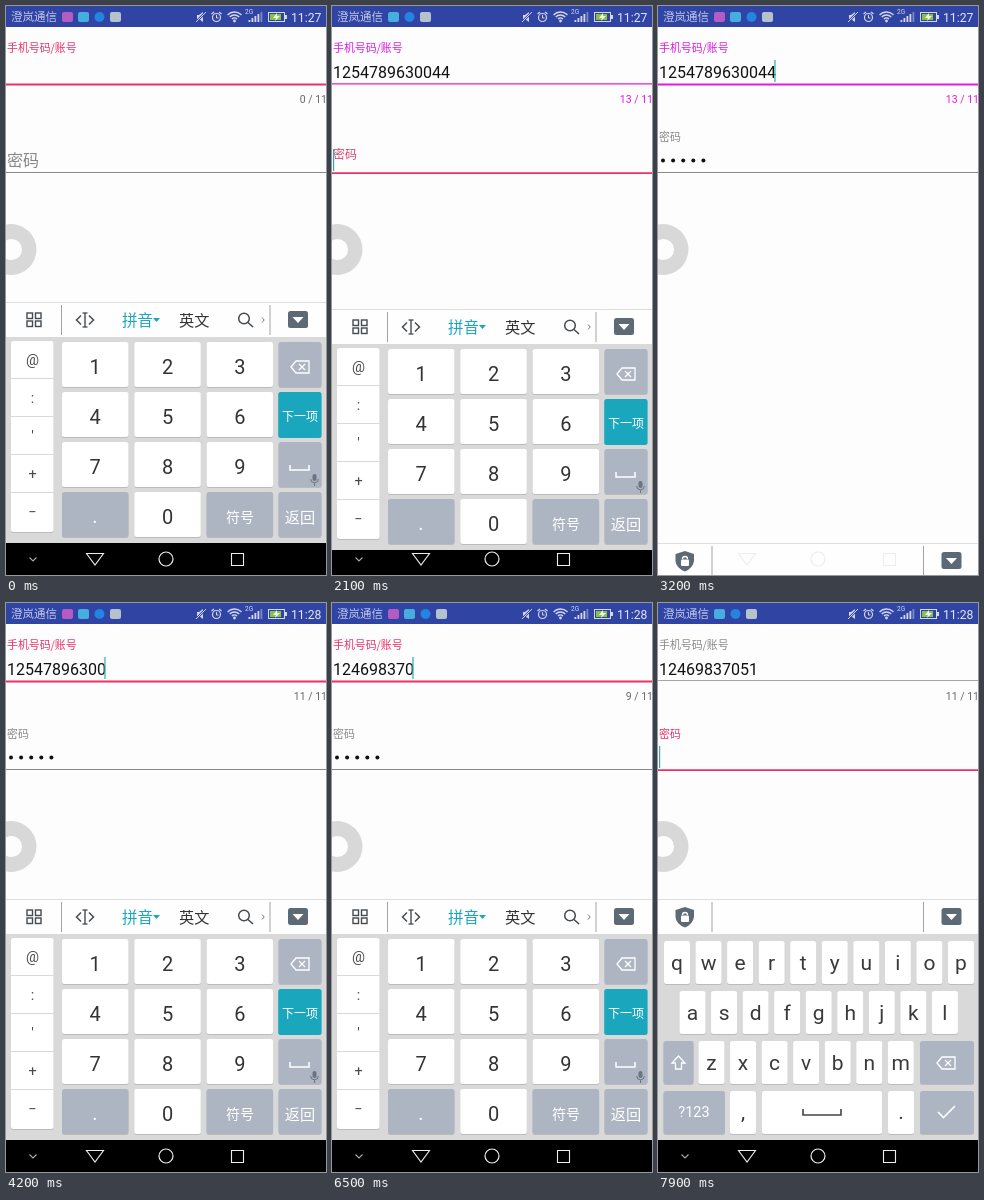
Recreate the animation shown at these times as an HTML page with a canvas. Size 320 by 569 pixels, loop 8 s.

```html
<!DOCTYPE html>
<html lang="zh-CN">
<head>
<meta charset="utf-8">
<title>Login form</title>
<style>
html, body { margin: 0; width: 100%; height: 100%; overflow: hidden; background: #fdfdfd; }
canvas { display: block; width: 320px; height: 569px; }
</style>
</head>
<body>
<canvas id="stage"></canvas>
<script>
const W = 320, H = 569, LOOP = 8000, STEP = 100;
const canvas = document.getElementById('stage');
const dpr = window.devicePixelRatio || 1;
canvas.width = W * dpr;
canvas.height = H * dpr;
const c = canvas.getContext('2d');
const CJK = '"Noto Sans CJK SC", "Noto Sans CJK", sans-serif';
const ROBOTO = 'Roboto, sans-serif';

const PINK = [238, 48, 102], GREY = [136, 136, 136], MAGENTA = [228, 24, 226];
const TEAL = '#1aa7be', KEY_GREY = '#adb5c3', SLATE = '#5d6a76';
const FIRST = '1254789630044', SECOND = '12469837051';

// Touch times
const firstAt = i => 220 + i * 130;
const secondAt = i => 5060 + i * 170;
const eraseAt = i => i < 2 ? 3900 + i * 200 : 4260 + (i - 2) * 55;
const dotAt = i => 2560 + i * 90;
const undotAt = i => 7380 + i * 85;
const TO_PASS = 1960, TO_PHONE = 2960, TO_PASS_2 = 6830;

const clamp = x => Math.max(0, Math.min(1, x));
const ramp = (t, start, len) => clamp((t - start) / len);
const lerp = (a, b, u) => a + (b - a) * u;
const rgb = a => `rgb(${a.map(Math.round)})`;
const mix = (a, b, u) => rgb(a.map((v, i) => lerp(v, b[i], u)));

function done(t, at, n) {
  let k = 0;
  while (k < n && t >= at(k)) k++;
  return k;
}

function pressed(t, at, n) {
  for (let i = 0; i < n; i++) if (t >= at(i) - 80 && t < at(i) - 15) return i;
  return -1;
}

function text(s, x, y, size, color, align = 'left', family = ROBOTO, weight = 400) {
  c.font = `${weight} ${size}px ${family}`;
  c.textAlign = align;
  c.fillStyle = color;
  c.fillText(s, x, y);
}

function box(x, y, w, h, color, r = 0) {
  c.fillStyle = color;
  c.beginPath();
  c.roundRect(x, y, w, h, r);
  c.fill();
}

function disc(x, y, r, color) {
  c.fillStyle = color;
  c.beginPath();
  c.arc(x, y, r, 0, Math.PI * 2);
  c.fill();
}

function ring(x, y, r, color, w = 1, a = 0, b = Math.PI * 2) {
  c.strokeStyle = color;
  c.lineWidth = w;
  c.beginPath();
  c.arc(x, y, r, a, b);
  c.stroke();
}

function trace(pts, close) {
  c.beginPath();
  for (let i = 0; i < pts.length; i += 2) c.lineTo(pts[i], pts[i + 1]);
  if (close) c.closePath();
}

function line(pts, color, w = 1, close = false) {
  trace(pts, close);
  c.strokeStyle = color;
  c.lineWidth = w;
  c.stroke();
}

function poly(pts, color) {
  trace(pts, true);
  c.fillStyle = color;
  c.fill();
}

function state(t) {
  let phone;
  if (t < 3800) phone = FIRST.slice(0, done(t, firstAt, 13));
  else if (t < 4900) phone = FIRST.slice(0, 13 - done(t, eraseAt, 13));
  else phone = SECOND.slice(0, done(t, secondAt, 11));
  const dots = done(t, dotAt, 5) - done(t, undotAt, 5);
  const onPhone = t < TO_PASS || (t >= TO_PHONE && t < TO_PASS_2);
  const focus = 1 - ramp(t, TO_PASS, 200) + ramp(t, TO_PHONE, 200) - ramp(t, TO_PASS_2, 200);

  let key = '';
  const a = pressed(t, firstAt, 13), b = pressed(t, secondAt, 11), d = pressed(t, dotAt, 5);
  if (a >= 0) key = FIRST[a];
  if (b >= 0) key = SECOND[b];
  if (d >= 0) key = 'asdfg'[d];
  if (pressed(t, eraseAt, 2) >= 0 || (t > 4220 && t < 4800) || pressed(t, undotAt, 5) >= 0) key = 'del';
  return { t, phone, dots, onPhone, focus, key };
}

function statusBar(s) {
  const ink = '#d3d8f0';
  box(0, 0, W, 21, '#3044a4');
  text('澄岚通信', 5, 15, 11.5, '#c3c9ea', 'left', CJK);
  let x = 56;
  const imeIcon = s.t < 2080 || (s.t >= 3000 && s.t < 6870);
  if (imeIcon) { box(x, 6, 11, 10, '#b45cc4', 2); x += 16; }
  box(x, 6, 11, 10, '#45aede', 2);
  disc(x + 21.5, 11, 5, '#2583e2');
  box(x + 32, 6, 11, 10, '#b5c2cc', 2);

  poly([191, 9, 193, 9, 197, 6, 197, 16, 193, 13, 191, 13], ink);
  line([190, 16, 200, 6], '#3044a4', 2.4);
  line([190, 16, 200, 6], ink, 1);
  ring(210.5, 11.5, 4, ink, 1.2);
  line([210.5, 9, 210.5, 12, 212.5, 12], ink);
  line([205.5, 8, 208, 6], ink, 1.2);
  line([213, 6, 215.5, 8], ink, 1.2);
  for (const r of [3.5, 6.5, 9.5]) ring(228.5, 15.5, r, ink, 1.4, -Math.PI * 0.76, -Math.PI * 0.24);
  disc(228.5, 15, 1.4, ink);
  text('2G', 239, 8, 6.5, ink);
  for (let i = 0; i < 5; i++) box(242.5 + i * 3, 14 - i * 2, 1.8, 2 + i * 2, i < 4 ? ink : '#7c88c8');
  c.strokeStyle = ink;
  c.lineWidth = 1;
  c.strokeRect(262.5, 6.5, 16, 9);
  box(279, 9, 2, 4, ink);
  box(264, 8, 11, 6, '#86c24a');
  poly([271, 7, 267, 12, 270, 12, 269, 15, 274, 10, 271, 10], '#f2f6e0');
  text(s.t < 3750 ? '11:27' : '11:28', 285, 15.5, 12.2, '#e3e7f6');
}

function form(s) {
  const over = s.phone.length > 11;
  const phoneInk = over ? rgb(MAGENTA) : mix(GREY, PINK, s.focus);
  text('手机号码/账号', 1, 46, 10.9, phoneInk, 'left', CJK, s.focus > 0.2 || over ? 500 : 400);
  text(s.phone, 1, 72, 16, '#111');
  box(0, 77.2 + s.focus * 0.3, W, lerp(0.9, 1.9, s.focus), phoneInk);
  text(`${s.phone.length} / 11`, 321, 97, 10.5, over ? rgb(MAGENTA) : '#666', 'right');
  if (s.onPhone && s.phone) {
    c.font = `16px ${ROBOTO}`;
    box(c.measureText(s.phone).width - 0.6, 54, 1.3, 22, '#35b3bb');
  }

  const u = ramp(s.t, TO_PASS, 200), passFocus = 1 - s.focus;
  const size = lerp(16, 10.9, u ** 0.7);
  text('密码', 1, lerp(154, 131, u ** 4) + size * 0.38, size, mix(GREY, PINK, passFocus), 'left', CJK,
    passFocus > 0.5 ? 500 : 400);
  for (let i = 0; i < s.dots; i++) disc(5 + i * 10.1, 154.5, 2, '#111');
  if (s.onPhone) box(0, 166, W, 1, rgb(GREY));
  else {
    box(0, 166.2, W, 1.9, rgb(PINK));
    box(1 + s.dots * 10.1, 143, 1.2, 22, '#35a9b0');
  }

  disc(5, 243.5, 25.5, '#d8d8d8');
  disc(5.5, 243.5, 10.5, '#fdfdfd');
}

function key(x, y, w, h, color = '#fff', down = false) {
  box(x, y + 1, w, h, '#b9bbbf', 2.5);
  box(x, y, w, h, down ? (color === '#fff' ? '#d6d6d6' : '#969fae') : color, 2.5);
}

function backspace(x, y) {
  line([x - 9, y, x - 4, y - 6, x + 9, y - 6, x + 9, y + 6, x - 4, y + 6], '#fff', 1.3, true);
  line([x - 1, y - 3, x + 5, y + 3], '#fff', 1.3);
  line([x + 5, y - 3, x - 1, y + 3], '#fff', 1.3);
}

function panel(sepA, sepB, dropX) {
  box(0, 296, W, 36, '#fefefe');
  box(0, 296, W, 1, '#dedede');
  box(0, 331, W, 206, '#d9d9d9');
  box(sepA, 299, 1, 30, '#a3a3a3');
  box(sepB, 299, 1, 30, '#a3a3a3');
  box(dropX, 305, 20, 17, SLATE, 2.5);
  poly([dropX + 4.5, 311, dropX + 15.5, 311, dropX + 10, 317], '#fff');
}

function numberPad(s) {
  panel(55, 263.5, 282);
  const ink = '#454b50';
  c.strokeStyle = ink;
  c.lineWidth = 1.4;
  for (const x of [21, 29.5]) for (const y of [307, 315]) c.strokeRect(x, y, 5.5, 5.5);
  line([75, 309.5, 70.5, 314, 75, 318.5], ink, 1.5);
  line([83, 309.5, 87.5, 314, 83, 318.5], ink, 1.5);
  line([79, 307, 79, 321], ink, 1.4);
  line([76.5, 307, 81.5, 307], ink, 1.3);
  line([76.5, 321, 81.5, 321], ink, 1.3);
  text('拼音', 116, 320, 15.5, TEAL, 'left', CJK, 500);
  poly([147, 312, 154, 312, 150.5, 316], TEAL);
  text('英文', 173, 320, 15.2, '#333', 'left', CJK);
  ring(238, 312.5, 5.3, ink, 1.5);
  line([242, 316.5, 247, 321], ink, 1.6);
  line([256, 311.5, 258.2, 314, 256, 316.5], '#777', 1);

  key(5, 335, 42.5, 191);
  ['@', ':', "'", '+', '−'].forEach((ch, i) => {
    if (i) box(5, 334 + i * 38, 42.5, 1, '#d8d8d8');
    text(ch, 26.5, 359 + i * 38, 14.5, '#4a4a4a', 'center');
  });
  for (let i = 0; i < 9; i++) {
    const x = 56 + (i % 3) * 72.3, y = 336 + Math.floor(i / 3) * 50, n = String(i + 1);
    key(x, y, 66.5, 45, '#fff', s.key === n);
    text(n, x + 33.2, y + 32, 20, '#333', 'center');
  }
  key(56, 486, 66.5, 45, KEY_GREY);
  text('.', 89, 517, 20, '#fff', 'center');
  key(128.3, 486, 66.5, 45, '#fff', s.key === '0');
  text('0', 161.5, 518, 20, '#333', 'center');
  key(200.6, 486, 66.5, 45, KEY_GREY);
  text('符号', 234, 516, 14, '#fff', 'center', CJK);

  key(272.5, 336, 43, 45, KEY_GREY, s.key === 'del');
  backspace(294, 361);
  box(272.2, 386, 43.4, 46, TEAL, 2.5);
  text('下一项', 294, 415, 12, '#fff', 'center', CJK, 500);
  key(272.5, 436, 43, 45, KEY_GREY);
  line([284, 459, 284, 464, 303, 464, 303, 459], '#fff', 1.5);
  box(306.5, 468, 4, 7, '#6c7480', 2);
  ring(308.5, 473, 3.8, '#6c7480', 1, 0, Math.PI);
  line([308.5, 477, 308.5, 480], '#6c7480');
  key(272.5, 486, 43, 45, KEY_GREY);
  text('返回', 294, 516.5, 15.2, '#fff', 'center', CJK, 500);
}

function letterPad(s) {
  panel(53.5, 265, 283.5);
  c.fillStyle = SLATE;
  c.beginPath();
  c.moveTo(27, 304);
  c.lineTo(36, 307);
  c.lineTo(36, 314);
  c.quadraticCurveTo(35, 321, 27, 324.5);
  c.quadraticCurveTo(18, 321, 17.5, 314);
  c.lineTo(17.5, 307);
  c.fill();
  box(23, 312.5, 8, 6.5, '#fff', 1);
  ring(27, 312, 2.5, '#fff', 1.3, Math.PI, 0);

  const rows = [['qwertyuiop', 6], ['asdfghjkl', 21.5], ['zxcvbnm', 40.5]];
  rows.forEach(([letters, left], r) => {
    [...letters].forEach((ch, i) => {
      const x = left + i * 31.55, y = 338 + r * 50;
      key(x, y, 26, 43, '#fff', s.key === ch);
      text(ch, x + 13, y + 29, 21, '#3a3a3a', 'center');
    });
  });
  key(5.5, 438, 30, 43, KEY_GREY);
  line([20.5, 453, 14, 460, 17.5, 460, 17.5, 466, 23.5, 466, 23.5, 460, 27, 460], '#fff', 1.3, true);
  key(262, 438, 54, 43, KEY_GREY, s.key === 'del');
  backspace(288, 460);
  key(5.5, 488, 61.5, 43, KEY_GREY);
  text('?123', 36, 514, 14.5, '#fff', 'center');
  key(72, 488, 26, 43);
  text(',', 85, 516, 21, '#333', 'center');
  key(104, 488, 120, 43);
  line([145, 506, 145, 512, 183, 512, 183, 506], '#444', 1.6);
  key(230, 488, 26, 43);
  text('.', 243, 516, 21, '#333', 'center');
  key(262, 488, 54, 43, KEY_GREY);
  line([280, 509, 285.5, 514.5, 297, 503], '#fff', 1.6);
}

const leave = (t, at) => 273 * ramp(t, at, 234) ** 2;
const enter = (t, at, len) => 273 * (1 - ramp(t, at, len)) ** 2;

function keyboard(s) {
  const t = s.t;
  let pad = numberPad, drop;
  if (t < 2300) drop = leave(t, 2063);
  else if (t < 3230) {
    pad = letterPad;
    drop = t < 2900 ? enter(t, 2310, 200) : leave(t, 2980);
  } else if (t < 7074) drop = t < 5000 ? enter(t, 3320, 240) : leave(t, 6840);
  else {
    pad = letterPad;
    drop = enter(t, 7074, 200);
  }
  c.save();
  c.translate(0, Math.round(drop));
  pad(s);
  c.restore();
}

function render(t) {
  const s = state(t);
  c.setTransform(dpr, 0, 0, dpr, 0, 0);
  box(0, 0, W, H, '#fdfdfd');
  form(s);
  statusBar(s);
  box(0, 537, W, 32, '#000');
  line([23.5, 551.5, 27, 555, 30.5, 551.5], '#aaa', 1.1);
  keyboard(s);
  const ink = '#ededed';
  line([80.5, 547.5, 97.5, 547.5, 89, 559], ink, 1.1, true);
  ring(160, 553, 7, ink, 1.2);
  line([225.5, 547.5, 237.5, 547.5, 237.5, 559.5, 225.5, 559.5], ink, 1.1, true);
}

const start = performance.now();
function tick() {
  const t = (performance.now() - start) % LOOP;
  render(Math.floor(t / STEP) * STEP);
  requestAnimationFrame(tick);
}
tick();
</script>
</body>
</html>
```
